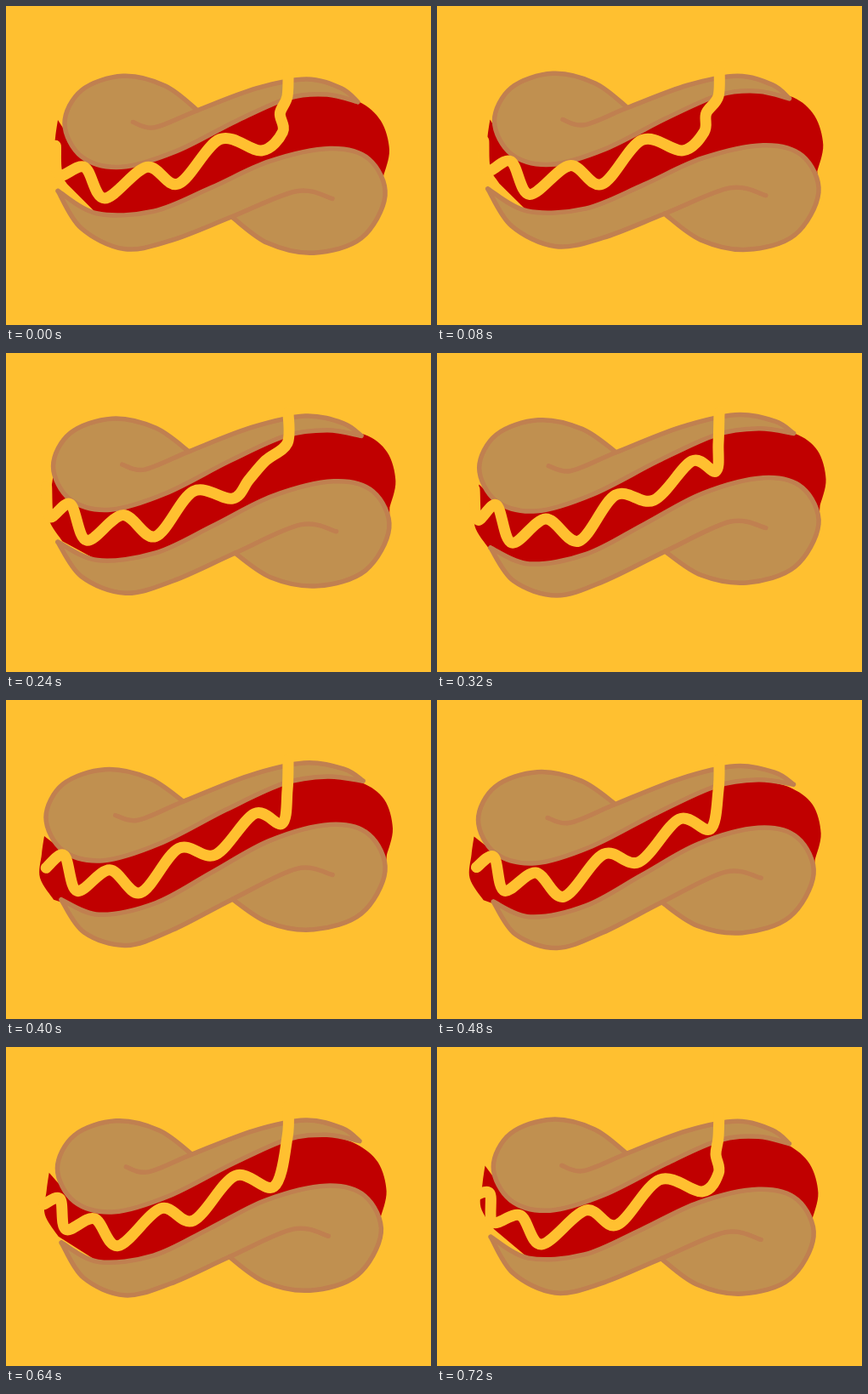
An HTML page that plays this animation: 500x375 px, repeating every 800 ms.

```html
<!DOCTYPE html>
<html lang="en">
<head>
<meta charset="utf-8">
<title>Hot dog loop</title>
<style>
  html, body { margin: 0; width: 100%; height: 100%; overflow: hidden; background: #ffc030; }
  svg { display: block; width: 100%; height: 100%; }
  .bun { fill: #c09050; }
  .line { fill: none; stroke: #c08050; stroke-width: 5.5; stroke-linecap: round; stroke-linejoin: round; }
  .mustard { fill: none; stroke: #ffc030; stroke-width: 13; stroke-linecap: round; stroke-linejoin: round; }
</style>
</head>
<body>
<svg viewBox="0 0 500 375">
  <path id="sausage" fill="#c00000"/>
  <path id="lowFill" class="bun"/>
  <path id="lowLine" class="line"/>
  <path id="topFill" class="bun"/>
  <path id="topLine" class="line"/>
  <path id="mustard" class="mustard"/>
</svg>
<script>
const STEP = 80, STEPS = 10;
const PINCH = 4;   // index on a bun edge where the lobe begins and the edge turns into the curl

const points = text => text.split(' ').map(p => p.split(',').map(Number));

// Resting shapes. Edge: tip, outside, pinch, curl. Lobe: from the pinch back to the tip.
const topEdge = points('417,104 396,89 352,80 290,93 217,121 165,142 139,136');
const topLobe = points('178,93 127,82 78,99 58,138 78,177 125,189 190,170 265,132 330,103 378,97');
const lowEdge = points('63,226 90,267 140,287 195,273 266,241 342,208 384,216');
const lowLobe = points('308,270 362,280 418,262 446,212 427,169 381,157 310,174 242,208 175,240 108,248');
const rightEnd = points('417,105 443,126 453,160 446,191');
const leftEnd = points('64,222 48,196 50,168 53,147');

// How each part rocks at its left and right end: [cos x, sin x, cos y, sin y].
const topSway = { left: [11, 1, 0, -5], right: [-5, 0, 10, -4], ease: u => u * u };
const lowSway = { left: [-2, -3, -9, -7], right: [0, 5, 11, -3], ease: u => u * (2 - u) };
const meatSway = { left: [8, 5, -13, -5], right: [-2, 5, 9, -7], ease: u => u };

// Routes of the mustard's bends from the stream to the left end, one point per half loop.
const crests = points('328,126 300,127 262,156 210,167 175,192 128,195 98,198 70,179 62,172 44,160');
const troughs = points('328,139 312,170 255,173 212,209 167,221 123,232 88,223 66,206 48,196 44,175');

const clamp = (v, lo, hi) => Math.max(lo, Math.min(hi, v));
const mix = (a, b, k) => a + (b - a) * k;

function sway(pts, { left, right, ease }, step) {
  const turn = step / STEPS * 2 * Math.PI;
  const c = Math.cos(turn), s = Math.sin(turn);
  return pts.map(([x, y]) => {
    const k = ease(clamp((x - 60) / 380, 0, 1));
    const [cx, sx, cy, sy] = left.map((v, i) => mix(v, right[i], k));
    return [x + cx * c + sx * s, y + cy * c + sy * s];
  });
}

// Smooth curve segments through the points.
function curve(pts) {
  const at = i => pts[clamp(i, 0, pts.length - 1)];
  const handle = (i, s) => at(i).map((v, j) => (v + s * (at(i + 1)[j] - at(i - 1)[j]) / 6).toFixed(1));
  return pts.slice(1).map((p, i) => `C${handle(i, 1)} ${handle(i + 1, -1)} ${p}`);
}

const set = (id, d) => document.getElementById(id).setAttribute('d', d);

function drawBun(name, edge, lobe) {
  const outer = curve(edge);
  const start = 'M' + edge[0];
  const inner = curve([edge[PINCH], ...lobe, edge[0]]).join('');
  set(name + 'Fill', start + outer.slice(0, PINCH).join('') + inner + 'Z');
  set(name + 'Line', start + outer.join('') + 'M' + edge[PINCH] + inner);
}

// The sausage fills the gap between the buns and sticks out at both ends.
function drawSausage(step, top, low) {
  const right = [top[top.length - 1], ...sway(rightEnd, meatSway, step)];
  const runs = [right, low.slice(3), sway(leftEnd, meatSway, step), top.slice(4)];
  set('sausage', runs.map((run, i) => (i ? 'L' : 'M') + run[0] + curve(run).join('')).join('') + 'Z');
}

// Bends on one route, youngest first; a new one leaves the stream each loop.
function bends(route, age) {
  const bob = Math.sin((age - Math.floor(age)) * 2 * Math.PI);
  const found = [];
  for (; age * 2 <= route.length - 1; age++) {
    const i = Math.min(Math.floor(age * 2), route.length - 2);
    const k = age * 2 - i;
    found.push({ age, at: route[i].map((v, j) => mix(v, route[i + 1][j], k)) });
  }
  return { found, bob };
}

function drawMustard(step) {
  const wrap = v => ((v % STEPS) + STEPS) % STEPS / STEPS;
  const high = bends(crests, wrap(step + 1)), deep = bends(troughs, wrap(step - 4));
  const chain = [...high.found, ...deep.found]
    .sort((a, b) => (a.age - b.age) || 0)
    .map(({ at: [x, y] }) => [x, y + 11 * deep.bob * clamp(1 - x / 330, 0, 1)]);
  const fresh = wrap(step + 1) < 0.5;
  if (fresh) {
    // The falling stream bulges to the right before it folds over.
    const [a, b] = chain;
    const swell = 14 * Math.max(0, Math.cos(step / STEPS * 2 * Math.PI));
    chain.splice(1, 0, [(a[0] + b[0]) / 2 + swell, (a[1] + b[1]) / 2]);
  }
  const line = [[332, 70], [331, 106], ...chain];
  set('mustard', 'M' + line[0] + curve(line).join(''));
}

function draw(step) {
  const top = sway(topLobe, topSway, step), low = sway(lowLobe, lowSway, step);
  drawSausage(step, top, low);
  drawBun('low', sway(lowEdge, lowSway, step), low);
  drawBun('top', sway(topEdge, topSway, step), top);
  drawMustard(step);
}

const begin = performance.now();
let shown = -1;
function tick() {
  const step = Math.floor((performance.now() - begin) / STEP) % STEPS;
  if (step !== shown) draw(shown = step);
  requestAnimationFrame(tick);
}
tick();
</script>
</body>
</html>
```
